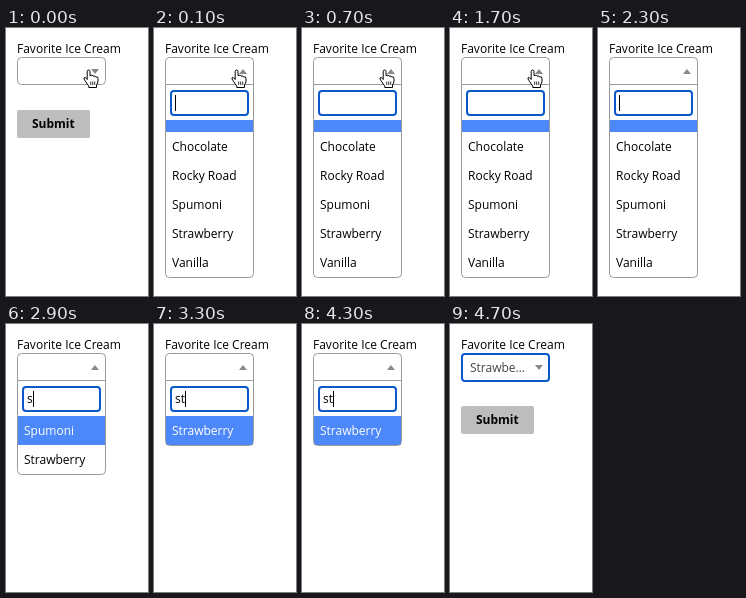
An HTML page for the animation above (5400 ms loop, 142 px wide and 268 px high).

```html
<!DOCTYPE html>
<html lang="en">
<head>
<meta charset="utf-8">
<title>Searchable select</title>
<style>
  html, body { margin: 0; width: 100%; height: 100%; overflow: hidden; background: #fff; }
  svg { display: block; width: 142px; height: 268px; }
  text { font: 12px "Open Sans", "Noto Sans", sans-serif; }
  .bold { font-weight: 700; }
  .line { fill: none; stroke: #999; }
  .ring { fill: #fff; stroke: #0a58ca; stroke-width: 2; }
  .hit { fill: #4d88fb; }
  .arrow { fill: #888; }
  .inv { fill: #fff; }

  /* Every change is a hard cut on one 5.4 s clock */
  .closed, .idle, .open, .all, .two, .one, .done, .caret, .typed, .hand {
    animation: 5.4s step-end infinite;
  }
  .closed { animation-name: closed; }
  .idle { animation-name: idle; }
  .open { animation-name: open; }
  .all { animation-name: all; }
  .two { animation-name: two; }
  .one { animation-name: one; }
  .done { animation-name: done; }
  .caret { animation-name: blink; }
  .typed { animation-name: typed; }
  .hand { animation-name: hand; }

  @keyframes closed { 0%, 87.03%, 100% { opacity: 1; } 1.85% { opacity: 0; } }
  @keyframes idle { 0% { opacity: 1; } 1.85%, 100% { opacity: 0; } }
  @keyframes open { 0%, 87.03%, 100% { opacity: 0; } 1.85% { opacity: 1; } }
  @keyframes all { 0%, 53.7%, 100% { opacity: 0; } 1.85% { opacity: 1; } }
  @keyframes two { 0%, 61.11%, 100% { opacity: 0; } 53.7% { opacity: 1; } }
  @keyframes one { 0%, 87.03%, 100% { opacity: 0; } 61.11% { opacity: 1; } }
  @keyframes done { 0% { opacity: 0; } 87.03%, 100% { opacity: 1; } }
  @keyframes blink {
    0%, 12.96%, 31.48%, 50%, 70.37%, 87.03%, 100% { opacity: 0; }
    1.85%, 22.22%, 40.74%, 53.7%, 79.62% { opacity: 1; }
  }
  @keyframes typed {
    0% { transform: none; }
    53.7% { transform: translateX(6px); }
    61.11%, 100% { transform: translateX(10px); }
  }
  @keyframes hand {
    0% { opacity: 1; transform: none; }
    33.33% { opacity: 1; transform: translate(6px, -23px); }
    35.18%, 100% { opacity: 0; transform: none; }
  }
</style>
</head>
<body>
<svg viewBox="0 0 142 268">
  <text x="11" y="25">Favorite Ice Cream</text>

  <g class="closed">
    <rect x="11" y="82" width="73" height="28" rx="2" fill="#bdbdbd"/>
    <text class="bold" x="26" y="100">Submit</text>
    <rect class="line idle" x="11.5" y="29.5" width="88" height="27" rx="4"/>
    <g class="done">
      <rect class="ring" x="12" y="30" width="87" height="27" rx="3"/>
      <text x="20" y="48" fill="#444">Strawbe…</text>
    </g>
    <path class="arrow" d="M85 41h8l-4 5z"/>
  </g>

  <g class="open">
    <path class="line" d="M11.5 56.5v-23q0-4 4-4h80q4 0 4 4v23z"/>
    <path class="arrow" d="M85 46h8l-4-5z"/>
    <rect class="ring" x="17" y="63" width="77" height="24" rx="3"/>

    <g class="all">
      <rect class="hit" x="12" y="92" width="87" height="12"/>
      <text x="18" y="123">Chocolate</text>
      <text x="18" y="152">Rocky Road</text>
      <text x="18" y="181">Spumoni</text>
      <text x="18" y="210">Strawberry</text>
      <text x="18" y="239">Vanilla</text>
      <path class="line" d="M11.5 56.5v189q0 4 4 4h80q4 0 4-4v-189"/>
    </g>

    <g class="two">
      <text x="21" y="79">s</text>
      <rect class="hit" x="12" y="92" width="87" height="29"/>
      <text class="inv" x="18" y="111">Spumoni</text>
      <text x="18" y="140">Strawberry</text>
      <path class="line" d="M11.5 56.5v90q0 4 4 4h80q4 0 4-4v-90"/>
    </g>

    <g class="one">
      <text x="21" y="79">st</text>
      <rect class="hit" x="12" y="92" width="87" height="29"/>
      <text class="inv" x="18" y="111">Strawberry</text>
      <path class="line" d="M11.5 56.5v61q0 4 4 4h80q4 0 4-4v-61"/>
    </g>

    <g class="typed"><rect class="caret" x="21" y="67" width="1" height="16"/></g>
  </g>

  <g class="hand" stroke="#000" stroke-linejoin="round">
    <path fill="#fff" d="M81.2 51.5V43.6Q81.2 42 82.6 42Q84 42 84 43.6V47.6Q86.7 46.3 87 48.2Q89.3 47.2 89.6 49Q92 48.2 92 50.5V53Q92 55 90.5 57V59.5H82.8V58Q81 56 80 54Q78.5 52 78 51Q77.6 49.3 79.3 49.6Q80.3 50 81.2 51.5z"/>
    <path fill="none" stroke-width=".8" d="M84.7 53.5v3.5M86.7 53.5v3.5M88.7 53.5v3.5"/>
  </g>
</svg>
</body>
</html>
```
